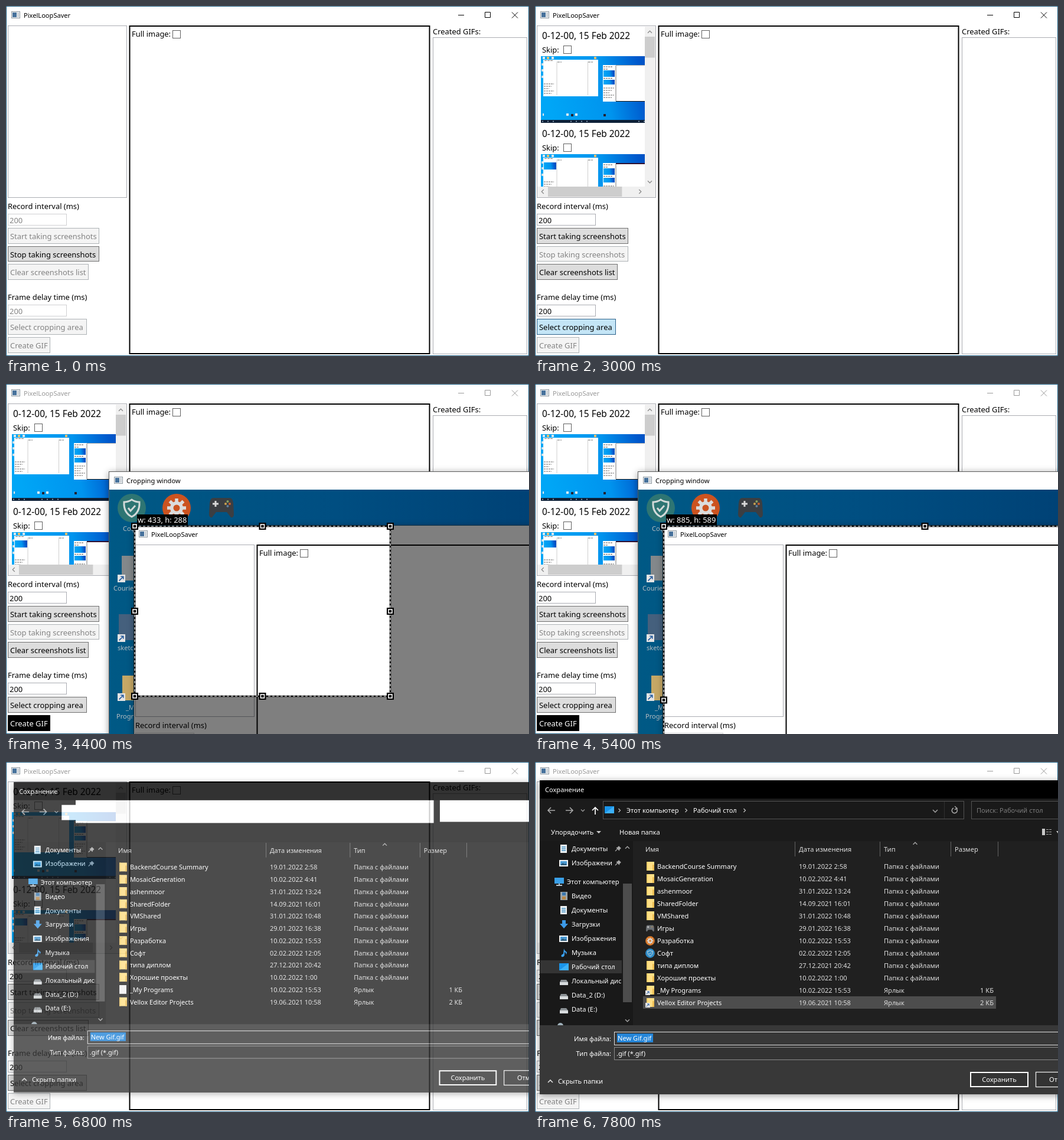
Animation of 886 by 593 pixels, one loop 8 s. Source, as an HTML page:

```html
<!DOCTYPE html>
<html lang="en">
<head>
<meta charset="utf-8">
<title>Screen recorder</title>
<style>
html, body { margin: 0; width: 100%; height: 100%; overflow: hidden; background: #fff; }
svg { display: block; width: 886px; height: 593px; overflow: hidden; }
text { font-family: "Noto Sans", "Open Sans", sans-serif; }
.shadow { filter: drop-shadow(0 2px 6px rgba(0, 0, 0, .4)); }
</style>
</head>
<body>
<svg viewBox="0 0 886 593">
  <defs>
    <linearGradient id="sky" x2="1" y2="-.1">
      <stop offset="0" stop-color="#00a6f6"/>
      <stop offset=".5" stop-color="#0094ee"/>
      <stop offset=".8" stop-color="#0058cc"/>
      <stop offset="1" stop-color="#0046b4"/>
    </linearGradient>
    <linearGradient id="dimSky">
      <stop offset="0" stop-color="#005985"/>
      <stop offset=".5" stop-color="#004f82"/>
      <stop offset="1" stop-color="#004276"/>
    </linearGradient>
    <clipPath id="thumbClip"><rect width="201" height="113"/></clipPath>
    <clipPath id="narrowList"><rect x="4" y="35" width="182" height="271"/></clipPath>
    <clipPath id="wideList"><rect x="4" y="35" width="200" height="271"/></clipPath>
    <clipPath id="sideClip"><rect x="9" y="134" width="138" height="312"/></clipPath>
  </defs>
  <g id="stage"></g>
</svg>
<script>
const STEP = 200, LOOP = 8000;
const APP = 'PixelLoopSaver';
const stage = document.getElementById('stage');

const rect = (x, y, w, h, fill, more = '') =>
  `<rect x="${x}" y="${y}" width="${w}" height="${h}" fill="${fill}" ${more}/>`;
const box = (x, y, w, h, stroke, fill = 'none', sw = 1) =>
  rect(x, y, w, h, fill, `stroke="${stroke}" stroke-width="${sw}"`);
const path = (d, stroke, sw = 1, fill = 'none', more = '') =>
  `<path d="${d}" stroke="${stroke}" stroke-width="${sw}" fill="${fill}" ${more}/>`;
const text = (x, y, s, size = 12.93, fill = '#000', more = '') =>
  `<text x="${x}" y="${y}" font-size="${size}" fill="${fill}" ${more}>${s}</text>`;
const circle = (x, y, r, fill) => `<circle cx="${x}" cy="${y}" r="${r}" fill="${fill}"/>`;
const group = (attrs, ...parts) => `<g ${attrs}>${parts.join('')}</g>`;
const at = (x, y, ...parts) => group(`transform="translate(${x} ${y})"`, ...parts);

const CHEVRON = { u: [-1, 0, 1, -1], d: [-1, 0, 1, 1], l: [0, 1, 0, -1], r: [0, 1, 0, 1] };
function chevron(x, y, dir, color, r = 3.5, sw = 1.3) {
  const flip = CHEVRON[dir][3] * r / 2;
  const d = dir === 'u' || dir === 'd'
    ? `M${x - r} ${y - flip}L${x} ${y + flip}L${x + r} ${y - flip}`
    : `M${x - flip} ${y - r}L${x + flip} ${y}L${x - flip} ${y + r}`;
  return path(d, color, sw);
}

const appIcon = (x, y) => box(x + .5, y + .5, 14, 11, '#8d979f', '#f4f6f7')
  + rect(x + 2, y + 2, 7, 8, '#46719b') + rect(x + 10, y + 2, 3, 8, '#c9d0d6');
const checkbox = (x, y) => box(x, y, 13, 13, '#606060', '#fff');

/* Main window */

const LOOKS = {
  normal: ['#ddd', '#707070', '#000'],
  off: ['#f4f4f4', '#adb2b5', '#838383'],
  hover: ['#bee6fd', '#3c7fb1', '#000'],
  down: ['#c4e5f6', '#2c628b', '#000'],
  dark: ['#000', '#000', '#fff']
};

function button(y, w, h, label, look) {
  const [fill, stroke, color] = LOOKS[look];
  return box(3.5, y + .5, w, h, stroke, fill) + text(7, y + 19, label, 12.93, color);
}

const input = (y, on) => box(3.5, y + .5, 99, 19, on ? '#abadb3' : '#cfd0d2', '#fff')
  + text(6, y + 16, '200', 12.93, on ? '#000' : '#838383');

function thumbnail(i) {
  const mini = (x, y, w, h) => rect(x, y, w, h, 'url(#sky)');
  const lines = (x, y, w, n) => Array.from({ length: n }, (_, k) =>
    path(`M${x} ${y + k * 4}h${w - (k % 3) * 4}`, '#999', 1.5, 'none', 'stroke-dasharray="3 1"')).join('');
  const icons = [43, 51, 58, 106].map((x, k) => rect(x, 97 + k % 2, 4, 4, k % 2 ? '#223' : '#e8eef2'));
  return group('clip-path="url(#thumbClip)"',
    rect(0, 0, 201, 113, 'url(#sky)'),
    [3, 10, 18, 90].map((x, k) => rect(x, 1, 4, 4, k % 2 ? '#e8c070' : '#dfe9ee')).join(''),
    [12, 22, 33].map(y => rect(1, y, 3, 4, '#cfe0ea')).join(''),
    rect(4, 6, 93, 62, '#fff'),
    path('M27 9V66M79.5 9V66', '#c4c4c4', .8),
    path('M6 7.5h14M80 10h8M28 10h7', '#777', 1, 'none', 'stroke-dasharray="4 1"'),
    i ? mini(5, 14, 21, 12) : '',
    lines(5, 47, 17, 5),
    rect(105, 15, 96, 62, '#fff'),
    rect(127, 15, 74, i ? 2 : 1, i ? '#301030' : '#aaa'),
    rect(127, 76, 74, 1, '#111'),
    path('M127 16v60', '#555', .8),
    path('M106 18h16M106 22h8M106 37.5h16', '#555', 1, 'none', 'stroke-dasharray="3 1"'),
    mini(106, 24, 19, 11), mini(106, 40, 19, 8),
    lines(106, 54, 18, 5),
    icons.join(''), rect(3, 97, 2, 4, '#dfe9ee'),
    rect(0, 108, 201, 5, '#0d2038'),
    path('M2 110.5h24M50 110.5h32M165 110.5h20', '#9fb4c8', 1.4, 'none', 'stroke-dasharray="2 7"'));
}

function shotList(n) {
  if (!n) return '';
  const pitch = 165.6, tall = n > 1, right = tall ? 186 : 204;
  const items = Array.from({ length: Math.min(n, 2) }, (_, i) => at(0, Math.round(i * pitch),
    text(12, 56, '0-12-00, 15 Feb 2022', 15.4),
    text(12, 79, 'Skip:'), checkbox(48.5, 67.5),
    at(10, 85, thumbnail(i))));
  const track = right - 40;
  const bars = rect(4, 306, 200, 18, '#f0f0f0')
    + rect(22, 306, track * (right - 4) / 212, 17, '#cdcdcd')
    + chevron(13, 314.5, 'l', '#8a8a8a') + chevron(right - 8, 314.5, 'r', '#8a8a8a');
  const side = rect(186, 35, 18, 289, '#f0f0f0')
    + rect(186, 52, 17, 238 * 272 / (n * pitch), '#cdcdcd')
    + chevron(194.5, 44, 'u', '#8a8a8a') + chevron(194.5, 298, 'd', '#8a8a8a');
  return group(`clip-path="url(#${tall ? 'narrowList' : 'wideList'})"`, ...items) + bars + (tall ? side : '');
}

function mainWindow({ shots = 0, ready = false, active = true, stop = 'normal', select = 'off', create = 'off' }) {
  const ink = active ? '#000' : '#999';
  const idle = ready ? 'normal' : 'off';
  return box(.5, .5, 885, 592, '#1b5d82', '#fff')
    + appIcon(9, 9) + text(30, 20, APP, 11.1, ink)
    + path('M766 15.5h10M811.5 10.5h9v9h-9zM857 10.5l10 10M867 10.5l-10 10', ink)
    + box(3.5, 33.5, 201, 291, '#abadb3') + shotList(shots)
    + box(209.5, 34, 508, 555, '#000', '#fff', 2)
    + text(213, 52, 'Full image:') + checkbox(282.5, 41.5)
    + text(723, 48, 'Created GIFs:') + box(723.5, 53.5, 159, 536, '#abadb3')
    + text(3, 344, 'Record interval (ms)') + input(352, ready)
    + button(376, 154, 26, 'Start taking screenshots', idle)
    + button(407, 154, 25, 'Stop taking screenshots', stop)
    + button(437, 136, 26, 'Clear screenshots list', idle)
    + text(3, 498, 'Frame delay time (ms)') + input(506, ready)
    + button(530, 133, 26, 'Select cropping area', select)
    + button(561, 71, 26, 'Create GIF', create);
}

/* Icons drawn around 0,0 */

const gear = color => circle(0, 0, 24, color) + circle(0, 0, 11, '#dcdcdc')
  + path('M0-16V16M-16 0H16M-11.5-11.5L11.5 11.5M-11.5 11.5L11.5-11.5', '#dcdcdc', 5.5)
  + circle(0, 0, 5.5, color);
const shield = color => circle(0, 0, 24, color)
  + path('M0-14Q6-10 13-10Q14 8 0 15Q-14 8-13-10Q-6-10 0-14Z', '#d3dad9', 3)
  + path('M-6 0l4 5l8-9', '#d3dad9', 3);
const gamepad = color =>
  path('M-14-17H14Q19-17 20-8L21 10Q21 17 16 16L9 7H-9L-16 16Q-21 17-21 10L-20-8Q-19-17-14-17Z', 'none', 0, color)
  + path('M-15-7h10M-10-12v10', '#d8d8d8', 3) + circle(7, -7, 2, '#c8a050') + circle(14, -7, 2, '#c86030')
  + circle(10.5, -11, 2, '#88a060') + circle(10.5, -3, 2, '#6080a0');
const small = (x, y, icon) => group(`transform="translate(${x} ${y}) scale(.33)"`, icon);
const shortcut = (x, y, s) => rect(x, y, s, s, '#e4e4e4')
  + path(`M${x + s * .2} ${y + s * .8}L${x + s * .75} ${y + s * .25}M${x + s * .4} ${y + s * .25}H${x + s * .75}V${y + s * .6}`, '#245a9c', s / 8);

/* Cropping window */

function selection(w, h) {
  const x = 218, y = 241;
  const handle = (hx, hy) => rect(hx - 6, hy - 6, 12, 12, '#000') + box(hx - 3, hy - 3, 6, 6, '#fff', '#000', 1.6);
  const spots = [[0, 0], [.5, 0], [1, 0], [0, .5], [1, .5], [0, 1], [.5, 1], [1, 1]];
  const label = `w: ${w}, h: ${h}`;
  return box(x, y, w, h, '#000', 'none', 2.6)
    + rect(x, y, w, h, 'none', 'stroke="#fff" stroke-width="1.2" stroke-dasharray="4 3"')
    + spots.map(([u, v]) => handle(x + w * u, y + h * v)).join('')
    + rect(222, 221, 86 + (label.length - 14) * 7.4, 18, '#000')
    + text(223, 235, label, 13, '#fff');
}

function cropWindow(w, h) {
  const label = (x, y, s) => text(x, y, s, 11.1, '#b4bcc0');
  const hole = w ? `M218 241h${w}v${h}h${-w}z` : '';
  return rect(174, 148, 730, 470, '#fff', 'class="shadow"')
    + box(174.5, 148.5, 740, 480, '#5c5c5c', '#fff')
    + appIcon(183, 157) + text(204, 168, 'Cropping window', 11.1)
    + rect(175, 179, 711, 414, 'url(#dimSky)')
    + at(213, 210, shield('#2e7573')) + at(289, 210, gear('#cc5320')) + at(365, 210, gamepad('#3b3e42'))
    + label(198, 249, 'Софт')
    + rect(196, 291, 30, 42, '#83888b') + shortcut(189, 323, 13) + label(182, 350, 'Couriers')
    + rect(191, 390, 30, 44, '#45607d') + shortcut(189, 424, 13) + label(189, 451, 'sketch')
    + rect(197, 494, 30, 42, '#c6a866') + shortcut(189, 524, 13)
    + label(203, 552, '_My') + label(187, 567, 'Programs')
    + rect(217, 240, 700, 400, '#000', 'class="shadow"')
    + at(216, 239, mainWindow({}))
    + path(`M216 239H886V593H216Z${hole}`, 'none', 0, '#000', 'fill-opacity=".5" fill-rule="evenodd"')
    + (w ? selection(w, h) : '');
}

/* Save dialog */

const FILES = [
  ['BackendCourse Summary', '19.01.2022 2:58'],
  ['MosaicGeneration', '10.02.2022 4:41'],
  ['ashenmoor', '31.01.2022 13:24'],
  ['SharedFolder', '14.09.2021 16:01'],
  ['VMShared', '31.01.2022 10:48'],
  ['Игры', '29.01.2022 16:38'],
  ['Разработка', '10.02.2022 15:53'],
  ['Софт', '02.02.2022 12:05'],
  ['типа диплом', '27.12.2021 20:42'],
  ['Хорошие проекты', '10.02.2022 1:00'],
  ['_My Programs', '10.02.2022 15:53', '1 КБ'],
  ['Vellox Editor Projects', '19.06.2021 10:58', '2 КБ']
];
const PLACES = [
  [147, 'Документы', 'doc'], [171, 'Изображени', 'pic'], [203, 'Этот компьютер', 'pc'],
  [227, 'Видео', 'film'], [251, 'Документы', 'doc'], [275, 'Загрузки', 'load'],
  [299, 'Изображения', 'pic'], [323, 'Музыка', 'note'], [347, 'Рабочий стол', 'desk'],
  [371, 'Локальный диск', 'disk'], [395, 'Data_2 (D:)', 'disk'], [419, 'Data (E:)', 'disk']
];
const ICONS = {
  doc: rect(-6, -7, 11, 14, '#f0f4f6') + path('M-4-3h7M-4 0h7M-4 3h7', '#3c8cc0', 1.3),
  pic: rect(-8, -5, 15, 11, '#f0f4f6') + rect(-6, -3, 11, 7, '#4a9ad4') + path('M-6 4l4-4l3 2l2-1l2 3z', 'none', 0, '#2c5a78'),
  pc: rect(-8, -7, 16, 10, '#3aa0e8') + path('M-5 6h10M0 3v3', '#b8c4cc', 2),
  film: rect(-6, -7, 12, 14, '#9aa4aa') + rect(-3, -6, 6, 5, '#3a78b0') + rect(-3, 1, 6, 5, '#b88848'),
  load: path('M-3-7h6v6h4l-7 8l-7-8h4z', 'none', 0, '#3c9ae8'),
  note: path('M0-7Q1-3 5-1Q5 2 3 3Q4 0 1-1V4Q0 8-4 7Q-6 4-1 2z', 'none', 0, '#3aa0f0'),
  desk: rect(-8, -6, 16, 12, '#1a94ea') + path('M-8 6L8-6V6z', 'none', 0, '#3cb0f8'),
  disk: path('M-5-2H4L7 2H-7z', 'none', 0, '#8c9296') + rect(-7, 2, 14, 5, '#d8dcde')
};

const folder = (x, y) => rect(x, y, 13, 15, '#ffdf85') + rect(x + 10, y + 5, 3, 10, '#eebf55') + rect(x, y, 2, 15, '#f4cd68');

function fileIcon(i, y, loaded) {
  if (loaded && i === 5) return small(195, y, gamepad('#6c7074'));
  if (loaded && i === 6) return small(195, y, gear('#d87828'));
  if (loaded && i === 7) return small(195, y, shield('#2f8cc8'));
  if (!loaded && i === 10) return rect(189, y - 8, 12, 15, '#f2f2f2');
  return folder(189, y - 8) + (loaded && i > 9 ? shortcut(187, y, 8) : '');
}

const say = (x, y, s, fill = '#fff', more = '') => text(x, y, s, 11.1, fill, more);

function navBar() {
  return box(115.5, 66.5, 611, 30, '#535353', '#191919')
    + at(126, 81, ICONS.desk)
    + chevron(143, 82, 'r', '#bbb', 3) + say(155, 86, 'Этот компьютер')
    + chevron(256, 82, 'r', '#bbb', 3) + say(268, 86, 'Рабочий стол') + chevron(355, 82, 'r', '#bbb', 3)
    + chevron(678, 83, 'd', '#999', 4, 1.6) + path('M693.5 67v29', '#303030')
    + path('M714 79a4.5 4.5 0 1 1-5-1M711 75l4 3.5l-4 2', '#aaa', 1.5)
    + box(739.5, 66.5, 160, 30, '#535353', '#191919') + say(748, 86, 'Поиск: Рабочий стол', '#7c7c7c')
    + path('M102 89V77M97 82l5-5l5 5', '#fff', 1.7)
    + say(27, 123, 'Упорядочить') + path('M104 117h8l-4 4z', 'none', 0, '#ccc')
    + say(143, 123, 'Новая папка')
    + rect(859, 113, 5, 11, '#c8c8c8') + path('M866 114.5h9M866 118.5h9M866 122.5h9', '#aaa', 1, 'none', 'stroke-dasharray="4 1"')
    + path('M883 117h6l-3 4z', 'none', 0, '#ccc');
}

const blankBar = () => rect(114, 62, 614, 39, '#fff') + rect(90, 70, 28, 26, '#fff') + rect(738.5, 62, 160, 37, '#fff');

function sidebar() {
  const rows = PLACES.map(([y, name, icon]) => {
    const x = icon === 'pc' ? 54 : 62;
    return at(x - 13, y, ICONS[icon]) + say(x, y + 4, name);
  });
  const pin = y => path(`M136 ${y + 4}l4-4M138 ${y - 2}l5 5M139 ${y - 1}l3-3l3 3l-3 3z`, '#a8a8a8', 1.2, '#a8a8a8');
  return group('clip-path="url(#sideClip)"', rect(9, 336, 138, 22, '#343434'), ...rows, pin(147), pin(171),
    circle(43, 447, 5, '#9fb0ba'))
    + rect(149, 206, 15, 201, '#4d4d4d')
    + chevron(156.5, 145, 'u', '#aaa') + chevron(156.5, 438, 'd', '#aaa');
}

function saveDialog(loaded, icons, hover) {
  const soft = '#dedede';
  const rows = FILES.map(([name, date, size], i) => {
    const y = 177 + i * 21;
    return (hover && i === 11 ? rect(183, y - 11, 598, 21, '#4d4d4d') : '')
      + fileIcon(i, y, icons) + say(207, y + 4, name) + say(447, y + 4, date, soft)
      + say(591, y + 4, size ? 'Ярлык' : 'Папка с файлами', soft)
      + (size ? say(777, y + 4, size, soft, 'text-anchor="end"') : '');
  });
  return rect(8, 31, 900, 532, '#202020', 'class="shadow"')
    + rect(8, 31, 900, 31, '#000') + rect(8, 62, 900, 72, '#1b1b1b')
    + say(17, 51, 'Сохранение')
    + path('M34 82H22M27 77l-5 5l5 5M52 82h12M59 77l5 5l-5 5', '#a8a8a8', 1.6)
    + chevron(81, 82, 'd', '#999', 3)
    + (loaded ? navBar() : blankBar())
    + rect(8, 134, 158, 312, '#191919') + sidebar()
    + say(187, 152, 'Имя', soft) + say(447, 152, 'Дата изменения', soft)
    + say(591, 152, 'Тип', soft) + say(711, 152, 'Размер', soft)
    + path('M440.5 135v25M584.5 135v25M704.5 135v25M784.5 135v25', '#636363')
    + chevron(644, 138, 'u', '#aaa')
    + rows.join('')
    + rect(8, 446, 900, 117, '#383838')
    + say(129, 473, 'Имя файла:', '#fff', 'text-anchor="end"') + box(134.5, 457.5, 800, 22, '#e0e0e0', '#383838')
    + rect(139, 460, 61, 15, '#2485d8') + say(140, 472, 'New Gif.gif')
    + say(129, 498, 'Тип файла:', '#fff', 'text-anchor="end"') + box(134.5, 483.5, 800, 21, '#8c8c8c', '#333')
    + say(138, 498, '.gif (*.gif)')
    + chevron(26, 541, 'u', '#ddd', 4, 1.6) + say(39, 545, 'Скрыть папки')
    + box(738, 526, 97, 24, '#fff', '#333', 2) + say(786.5, 542, 'Сохранить', '#fff', 'text-anchor="middle"')
    + box(848.5, 525.5, 97, 25, '#e8e8e8', '#333', 1.3) + say(871, 542, 'Отмена');
}

/* Timeline, in steps of 200 ms */

function scene(s) {
  const ready = s >= 13;
  let out = mainWindow({
    shots: s <= 5 ? s : Math.min(11, s - 1),
    ready,
    active: s < 16 || s === 33,
    stop: ready ? 'off' : s === 12 ? 'down' : s === 11 ? 'hover' : 'normal',
    select: !ready ? 'off' : s === 14 ? 'hover' : s === 15 ? 'down' : 'normal',
    create: s < 16 || s > 33 ? 'off' : s === 33 ? 'down' : 'dark'
  });
  if (s >= 16 && s <= 32) {
    const p = Math.min(1, Math.max(0, (s - 20) / 7));
    const grow = 1 - (1 - p) ** 2;
    const fade = s === 16 || s === 32 ? .5 : 1;
    out += group(`opacity="${fade}"`, cropWindow(Math.round(885 * grow), Math.round(589 * grow)));
  }
  if (s >= 34) {
    const opening = s === 34;
    out += group(opening ? 'opacity=".8" transform="translate(447 297) scale(.988) translate(-447 -297)"' : '',
      saveDialog(!opening, s > 35, s > 36));
  }
  return out;
}

const start = performance.now();
let shown = -1;
function draw(now) {
  const step = Math.floor(Math.max(0, now - start) % LOOP / STEP);
  if (step !== shown) {
    stage.innerHTML = scene(step);
    shown = step;
  }
  requestAnimationFrame(draw);
}
draw(start);
</script>
</body>
</html>
```
